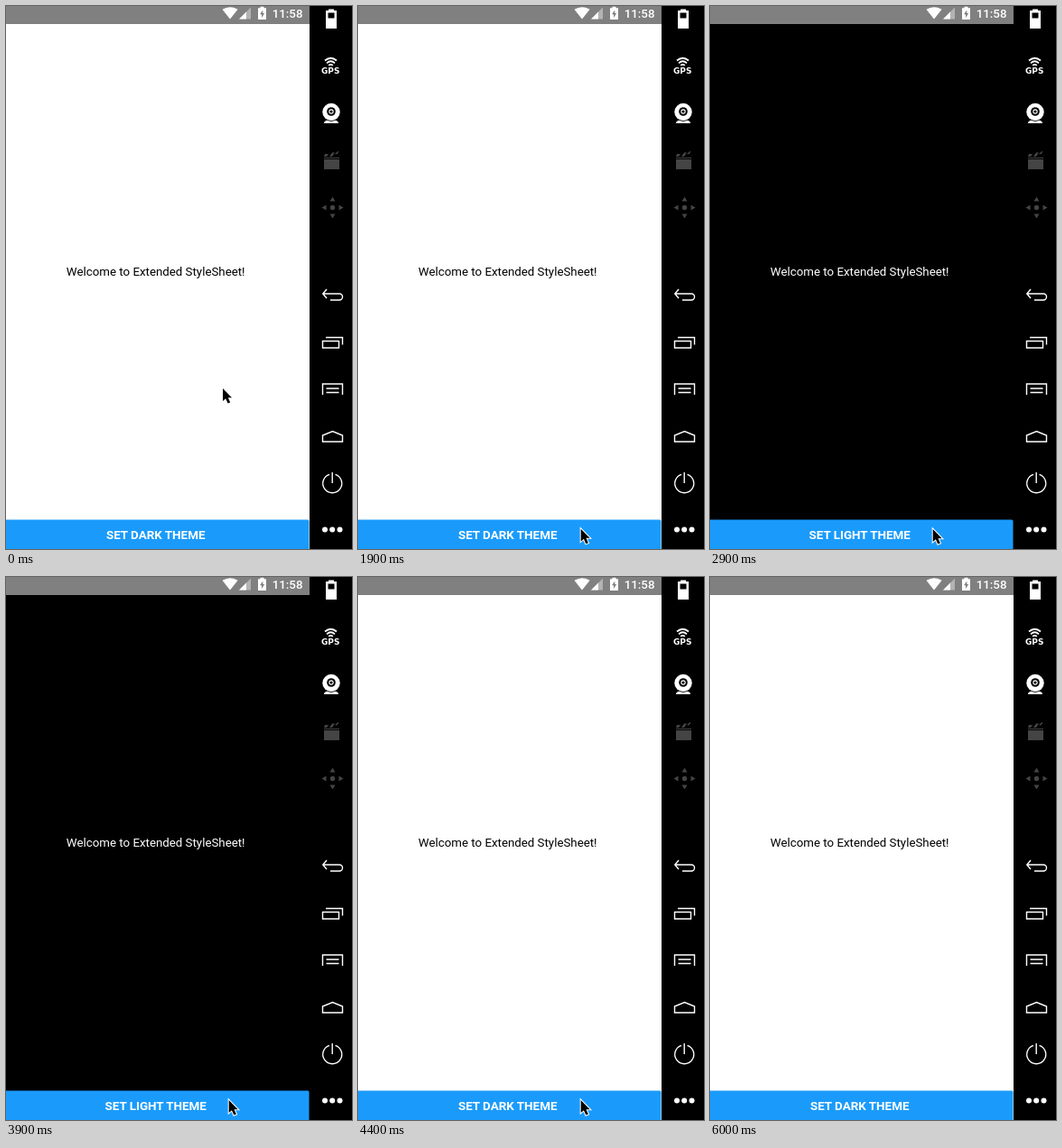
These frames come from a looping animation (383x602 px, 6.3 s). An HTML page:

```html
<!DOCTYPE html>
<html lang="en">
<head>
<meta charset="utf-8">
<title>Theme switch</title>
<style>
html, body { margin: 0; width: 100%; height: 100%; overflow: hidden; background: #000; }
svg { display: block; }
text { font-family: Roboto, sans-serif; font-size: 13.3px; fill: #fff; }
.mid { text-anchor: middle; }
.line { fill: none; stroke: #fff; stroke-width: 1.4; }
</style>
</head>
<body>
<svg width="383" height="602" viewBox="0 0 383 602">
  <!-- app -->
  <rect id="page" y="20" width="336" height="582" fill="#fff"/>
  <text id="welcome" class="mid" x="165.7" y="299">Welcome to Extended StyleSheet!</text>
  <path d="M0 569.5H334Q335.5 569.5 335.5 571V602H0Z" fill="#1a9bfc"/>
  <text id="label" class="mid" x="165.7" y="591" style="font-size:13.45px" font-weight="700"></text>

  <!-- status bar -->
  <rect width="336" height="20" fill="#808080"/>
  <g fill="#fff">
    <path d="M239.5 3.8Q248-1.5 256.5 3.8L248 14.5Z"/>
    <path d="M271 1.5V14.5H258Z" opacity=".4"/>
    <path d="M266 6.5V14.5H258Z"/>
    <path d="M281.5 2.2V.8H285.5V2.2H288V15H279V2.2Z"/>
    <path d="M284.3 4.5L281 9.2H283V13L286.2 8H284.3Z" fill="#808080"/>
  </g>
  <text x="294.7" y="13" font-weight="500">11:58</text>

  <!-- emulator side panel -->
  <rect x="336" width="47" height="602"/>
  <g fill="#fff">
    <path d="M357 5V3.5H363V5H366V25H354V5Z"/>
    <rect x="356.5" y="7.5" width="7" height="6" fill="#000"/>
    <text x="359.2" y="75" class="mid" style="font:bold 9px 'DejaVu Sans',sans-serif">GPS</text>
    <circle cx="360" cy="117.5" r="9.7"/>
    <path d="M352 130Q352 127.5 355.5 126.8Q360 129 364.5 126.8Q368 127.5 368 130Z"/>
    <circle cx="360" cy="117" r="4.8" fill="#000"/>
    <circle cx="360" cy="117" r="2.7"/>
    <circle cx="360" cy="117" r="1.6" fill="#000"/>
    <circle cx="353" cy="580.5" r="3"/>
    <circle cx="361.2" cy="580.5" r="3"/>
    <circle cx="369.5" cy="580.5" r="3"/>
  </g>
  <g fill="#444">
    <path d="M352 170H369V181H352Z"/>
    <path d="M352 167H355L357 164H353ZM358 167H361L364 162.5H361ZM364 164L368 160.5V162.5L366 164.5ZM352 168H369V169H352Z"/>
    <circle cx="361.5" cy="223.5" r="2.7"/>
    <path d="M361.5 211.5L364.5 216.5H358.5ZM361.5 235.5L364.5 230.5H358.5ZM349.5 223.5L354.5 220.5V226.5ZM373.5 223.5L368.5 220.5V226.5Z"/>
  </g>
  <g class="line">
    <path d="M353 60.5Q359.5 55 366 60.5M355 63.3Q359.5 59.3 364 63.3M357.2 66Q359.5 63.6 361.8 66" stroke-width="1.8"/>
    <path d="M355 314L350.8 319L355 324M351 319H369A3.5 3.5 0 0 1 369 326H359"/>
    <path d="M350.5 371.5H368.5V379H350.5ZM354 367.5H372.5V375.5"/>
    <path d="M350.5 431V419H372.5V431M354.5 424H368.5M354.5 428.5H368.5"/>
    <path d="M350.5 483V476L361.5 471.5L372.5 476V483Z"/>
    <path d="M358 519.3A10.5 10.5 0 1 0 364.5 519.3M361.2 517V529"/>
  </g>

  <path id="cursor" d="M0 0V14L3.2 11.2L5.6 16.6L8.2 15.5L5.8 10.2H10Z"
        stroke="#fff" stroke-width="2" paint-order="stroke"/>
</svg>
<script>
const LOOP = 6300, STEP = 100;
const DARK_FROM = 2900, DARK_TO = 4400;
// pointer path: time, x, y
const path = [
  [0, 240, 424], [300, 240, 424], [700, 248, 455], [1000, 242, 503],
  [1100, 246, 532], [1300, 246, 563], [1700, 246.7, 579], [2000, 246.7, 580],
  [4800, 246.7, 580], [5500, 243, 605], [LOOP, 243, 605]
];
const el = id => document.getElementById(id);
const page = el('page'), welcome = el('welcome'), label = el('label'), cursor = el('cursor');

function pointerAt(t) {
  const i = path.findIndex(p => p[0] > t);
  const [t0, x0, y0] = path[i - 1], [t1, x1, y1] = path[i];
  const k = (t - t0) / (t1 - t0);
  return [x0 + (x1 - x0) * k, y0 + (y1 - y0) * k];
}

function draw(now) {
  const t = Math.floor(now % LOOP / STEP) * STEP;
  const dark = t >= DARK_FROM && t < DARK_TO;
  page.style.fill = dark ? '#000' : '#fff';
  welcome.style.fill = dark ? '#fff' : '#000';
  label.textContent = `SET ${dark ? 'LIGHT' : 'DARK'} THEME`;
  cursor.setAttribute('transform', `translate(${pointerAt(t)})`);
}

const start = performance.now();
function tick() {
  draw(performance.now() - start);
  requestAnimationFrame(tick);
}
tick();
</script>
</body>
</html>
```
